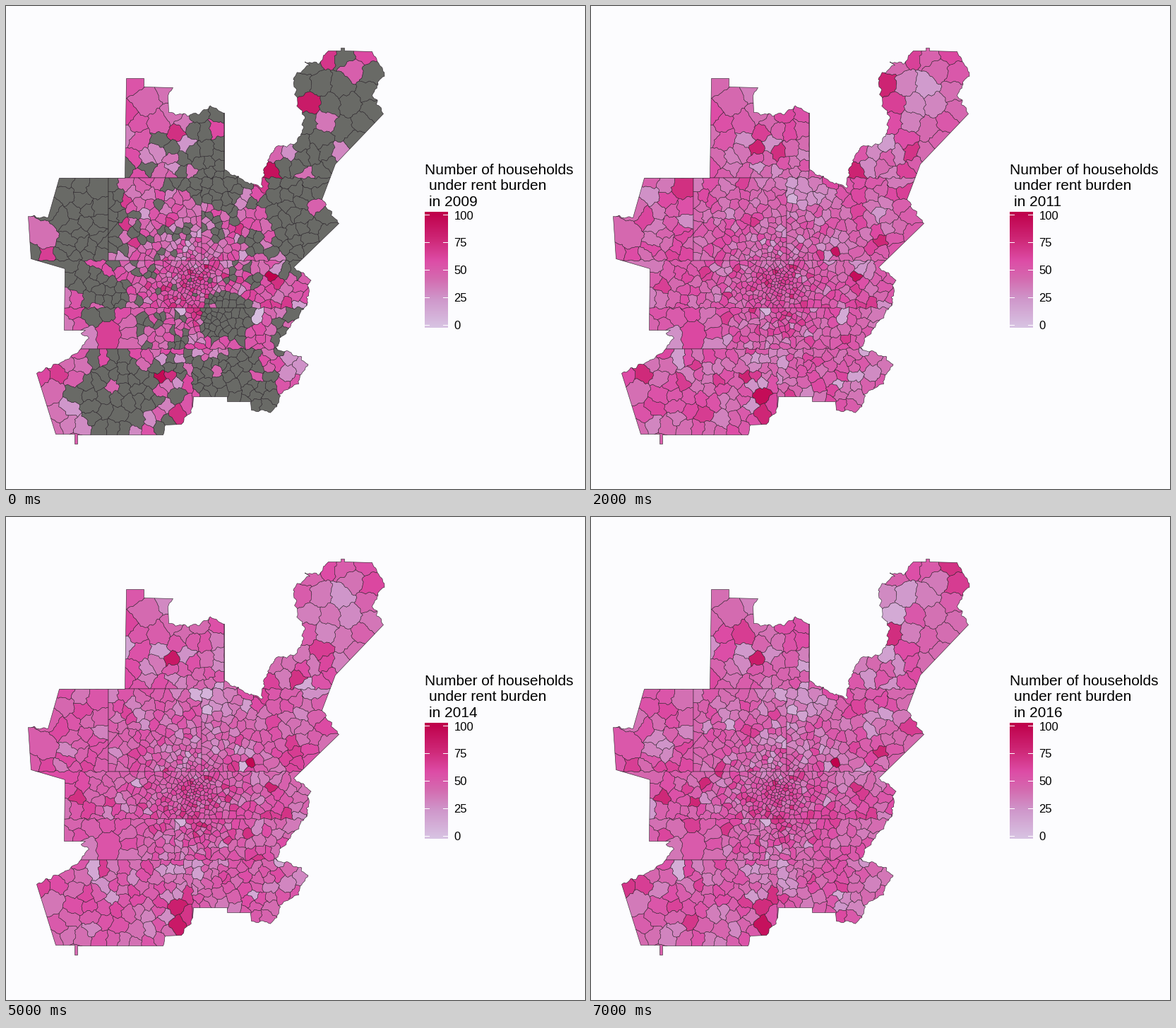
A matplotlib script for the animation above (8 s loop, 820 px wide and 683 px high).

```python
import numpy as np
import matplotlib.pyplot as plt
from matplotlib.animation import FuncAnimation
from matplotlib.collections import PolyCollection
from matplotlib.colors import LinearSegmentedColormap
from matplotlib.patches import Polygon, Rectangle
from matplotlib.path import Path

W, H, DPI = 820, 683, 64
PX = 72 / DPI
YEARS = np.arange(2009, 2017)
GREY = (0.412, 0.416, 0.4, 1)
INK = (0.13, 0.1, 0.13, 0.9)
HUB = np.array([266, 382])
rng = np.random.default_rng(2009)

RAMP = LinearSegmentedColormap.from_list("burden", [
    (0, "#d8c4e3"), (.25, "#cf96ca"), (.42, "#d46bb0"),
    (.58, "#dd4ca6"), (.75, "#cf2a7a"), (1, "#bf004a")], N=512)

# Outer border, clockwise from the north-west corner
BORDER = np.array([
    (170, 102), (195, 102), (195, 114), (236, 115), (229, 126), (230, 150),
    (256, 154), (277, 151), (288, 141), (309, 151), (309, 231), (338, 247),
    (361, 256), (366, 228), (380, 199), (404, 196), (418, 183), (422, 153),
    (413, 140), (406, 102), (428, 83), (424, 78), (441, 81), (456, 63),
    (474, 63), (474, 59), (479, 59), (479, 63), (518, 64), (536, 94),
    (519, 124), (534, 152), (466, 223), (447, 273), (471, 307), (407, 369),
    (430, 386), (425, 423), (396, 460), (381, 483), (415, 495), (427, 510),
    (413, 526), (415, 533), (385, 549), (388, 558), (376, 573), (347, 571),
    (346, 559), (313, 559), (313, 552), (265, 552), (264, 566), (248, 591),
    (225, 592), (222, 606), (101, 606), (101, 619), (97, 619), (97, 605),
    (70, 605), (43, 519), (82, 502), (105, 485), (115, 470), (107, 463),
    (112, 458), (82, 458), (83, 371), (35, 357), (31, 297), (59, 299),
    (75, 243), (168, 243)]) + .5

# Bands of districts: top, bottom, then the cuts from west to east
BANDS = [(50, 243, (20, 309, 560)), (243, 360, (20, 145, 277, 560)),
         (360, 427, (20, 560)), (427, 485, (20, 239, 560)),
         (485, 640, (20, 264, 560))]
# District lines that run dead straight
SURVEYED = [(168, 243, 253, 243), (145, 243, 145, 360), (145, 360, 190, 360),
            (105, 485, 183, 485), (239, 427, 340, 427), (277, 290, 277, 360)]

# Large or striking tracts: x, y, clear radius, value at start and end
LANDMARKS = [
    (198, 135, 36, 44, 42), (190, 188, 20, 50, 57), (242, 180, 14, 72, 45),
    (265, 207, 13, 84, 44), (55, 325, 34, 40, 52), (84, 268, 22, 16, 55),
    (125, 258, 14, 85, 40), (145, 462, 32, 64, 50), (97, 432, 20, 60, 40),
    (100, 398, 10, 60, 76), (66, 545, 28, 42, 36), (187, 586, 18, 28, 45),
    (242, 549, 17, 100, 74), (240, 577, 14, 72, 90), (218, 524, 13, 94, 42),
    (124, 498, 14, 24, 12), (492, 90, 20, 48, 36), (518, 97, 17, 46, 66),
    (417, 112, 13, 98, 30), (430, 137, 12, 84, 14), (453, 208, 12, 76, 55),
    (375, 235, 11, 90, 52), (450, 298, 17, 42, 66), (376, 383, 10, 99, 72),
    (345, 347, 7, 84, 99), (356, 440, 14, 4, 40), (398, 520, 18, 28, 33),
    (322, 538, 15, 68, 38), (249, 433, 8, 9, 10)]

# Areas without data in the first year: x, y, radius
BLANKS = [(112, 300, 56), (100, 375, 28), (150, 545, 62), (500, 150, 45),
          (425, 185, 28), (430, 95, 32), (520, 90, 26), (295, 235, 50),
          (440, 280, 76), (325, 540, 54), (312, 440, 38), (145, 405, 28)]


def scatter():
    """Tract centres: landmarks, then random ones, denser near the hub."""
    kept = np.array([m[:2] for m in LANDMARKS], float)
    clear = np.array([m[2] for m in LANDMARKS], float)
    spots = np.vstack([rng.normal(HUB, 50, (5000, 2)),
                       rng.uniform((30, 58), (537, 620), (16000, 2))])
    spots = spots[Path(BORDER).contains_points(spots)]
    for p in spots:
        dx, dy = p - HUB
        far = np.hypot(dx, dy * (.75 if dy > 0 else 1))
        room = (4 + .082 * far) * rng.uniform(.62, 1.25)
        if np.all(np.hypot(*(kept - p).T) > np.maximum(room, clear)):
            kept = np.vstack([kept, p])
            clear = np.append(clear, 0)
    return kept


def halfplane(poly, a, b):
    """Keep the part of poly that is nearer to a than to b."""
    n = b - a
    side = poly @ n - n @ (a + b) / 2
    if side.max() <= 0:
        return poly
    out = []
    for i, q in enumerate(poly):
        s, t = side[i - 1], side[i]
        if (s > 0) != (t > 0):
            out.append(poly[i - 1] + (q - poly[i - 1]) * s / (s - t))
        if t <= 0:
            out.append(q)
    return np.array(out)


def cell(a, group, box):
    """Voronoi cell of a inside its district."""
    x0, y0, x1, y1 = box
    poly = np.array([(x0, y0), (x1, y0), (x1, y1), (x0, y1)], float)
    gap = np.hypot(*(group - a).T)
    for k in np.argsort(gap)[1:]:
        if gap[k] > 2 * np.hypot(*(poly - a).T).max():
            break
        poly = halfplane(poly, a, group[k])
    return poly


def districts():
    for y0, y1, cuts in BANDS:
        for x0, x1 in zip(cuts, cuts[1:]):
            yield x0, y0, x1, y1


def straight_parts():
    """Long or axis-aligned stretches of the border, and surveyed lines."""
    nxt = np.roll(BORDER, -1, axis=0)
    d = np.abs(nxt - BORDER)
    keep = (np.hypot(*d.T) > 48) | (d.min(axis=1) <= 1)
    return np.vstack([np.hstack([BORDER, nxt])[keep], SURVEYED])


STRAIGHT = straight_parts()


def rough(poly, step=2.5):
    """Bend edges like rivers and roads, but leave straight lines alone."""
    pts = []
    for p, q in zip(poly, np.roll(poly, -1, axis=0)):
        n = max(1, int(np.hypot(*(q - p)) / step))
        pts.append(p + (q - p) * np.arange(n)[:, None] / n)
    pts = np.vstack(pts)
    a, d = STRAIGHT[:, :2], STRAIGHT[:, 2:] - STRAIGHT[:, :2]
    rel = pts[:, None] - a
    t = np.clip((rel * d).sum(2) / (d * d).sum(1), 0, 1)
    gap = np.linalg.norm(rel - t[..., None] * d, axis=2).min(axis=1)
    amp = np.clip(gap / 8, 0, 1) * np.clip(np.hypot(*(pts - HUB).T) / 100, .3, 1.4)
    x, y = pts.T
    dx = np.sin(.43 * y + .17 * x) + .6 * np.sin(.81 * y - .36 * x + 1)
    dy = np.sin(.39 * x - .21 * y + 2) + .6 * np.sin(.77 * x + .4 * y)
    return pts + (amp * np.array([dx, dy])).T


def bump(p, x, y, r):
    return np.exp(-((p[0] - x) ** 2 + (p[1] - y) ** 2) / r ** 2)


def history(p):
    """Yearly values at p: a local mean, a tract offset and yearly noise."""
    mean = (46 - 12 * bump(p, 290, 262, 45) - 14 * bump(p, 262, 338, 28)
            + 10 * bump(p, 265, 400, 55))
    return np.clip(mean + rng.normal(0, 9) + rng.normal(0, 6, len(YEARS)), 8, 96)


def blank(p):
    """Whether the tract at p has no data in the first year."""
    inside = any(np.hypot(p[0] - x, p[1] - y) < r for x, y, r in BLANKS)
    near = np.hypot(*(p - HUB)) < 55
    return rng.random() < (.95 if inside else .05 if near else .25)


seeds = scatter()
mesh, table = [], []
for box in districts():
    inside = np.all((seeds >= box[:2]) & (seeds < box[2:]), axis=1)
    for k in np.flatnonzero(inside):
        p = seeds[k]
        mesh.append(rough(cell(p, seeds[inside], box)))
        if k < len(LANDMARKS):
            values = np.linspace(*LANDMARKS[k][3:], len(YEARS))
        else:
            values = history(p)
        colours = RAMP(values / 100)
        if blank(p):
            colours[0] = GREY
        table.append(colours)
paint = np.array(table)

fig = plt.figure(figsize=(W / DPI, H / DPI), dpi=DPI, facecolor="#fcfcfe")
ax = fig.add_axes([0, 0, 1, 1])
ax.axis("off")

outline = Polygon(rough(BORDER), fc="none", ec=INK, lw=.6 * PX, zorder=3)
ax.add_patch(outline)
tracts = PolyCollection(mesh, edgecolors=[INK], linewidths=.55 * PX, zorder=2)
ax.add_collection(tracts)
tracts.set_clip_path(outline)


def label(x, y, text, size=20.9):
    return ax.text(x, y, text, fontsize=size * PX, family="Liberation Sans",
                   color="black", va="baseline")


# Legend
label(593, 238, "Number of households")
label(599, 260.5, "under rent burden")
heading = label(599, 283, "")
ax.imshow(RAMP(np.linspace(1, 0, 164))[:, None], extent=(593, 626, 455, 291),
          aspect="auto", interpolation="nearest", zorder=2)
ax.set(xlim=(0, W), ylim=(H, 0))
for v in range(0, 101, 25):
    y = 451.2 - 1.556 * v
    for x in (593, 619.4):
        ax.add_patch(Rectangle((x, y - .5), 6.6, 1, fc="white", lw=0, zorder=3))
    label(634.5, y + 5.9, str(v), 16.6)


def update(i):
    tracts.set_facecolor(paint[:, i])
    heading.set_text(f"in {YEARS[i]}")
    return tracts, heading


anim = FuncAnimation(fig, update, frames=len(YEARS), interval=1000, repeat=True,
                     repeat_delay=0, blit=False)
plt.show()
```
